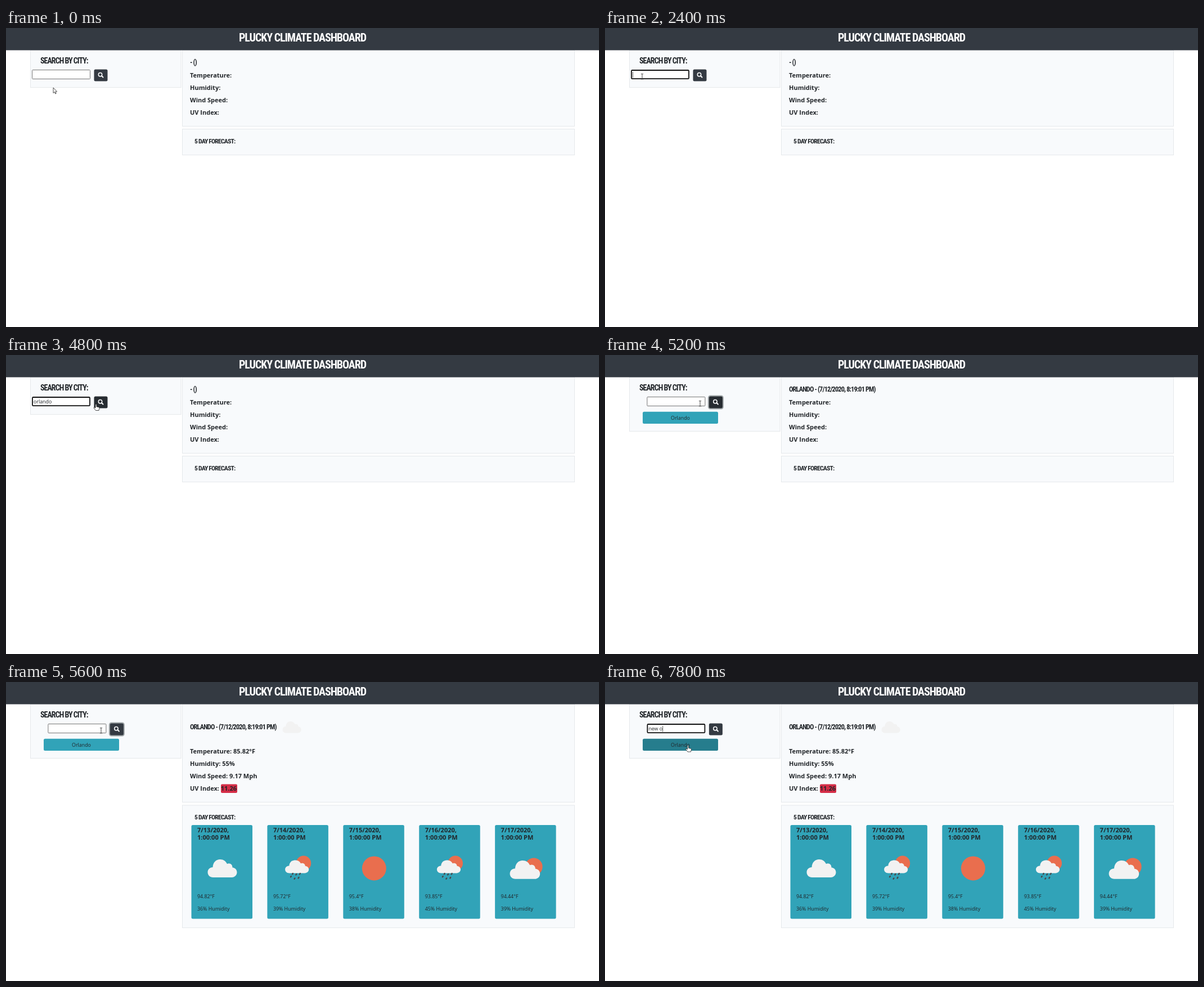
Animation, 1054 px wide and 531 px high, one loop 8 s. Source, as an HTML page:

```html
<!DOCTYPE html>
<html lang="en">
<head>
<meta charset="utf-8">
<title>Weather dashboard</title>
<style>
  html, body { margin: 0; width: 100%; height: 100%; overflow: hidden; background: #fff; }
  svg { display: block; width: 1054px; height: 531px; }
  text { font: 8.85px "Open Sans", sans-serif; fill: #212529; white-space: pre; }
  .head { font: 700 12.3px "Roboto Condensed", Roboto, sans-serif; font-stretch: 75%; letter-spacing: -.07em; }
  .title { font-size: 20px; fill: #fff; text-anchor: middle; letter-spacing: -.053em; }
  .search { font-size: 14px; }
  .days { font-size: 11.7px; }
  .bold { font-weight: 700; font-size: 11px; }
  .mid { text-anchor: middle; }
  .panel { fill: #f8fafc; stroke: #e5e8eb; }
  .teal { fill: #31a3b8; }
  .hover { fill: #267d8d; }
  .cloud { fill: #f2f2f2; }
  .sun { fill: #e96e4e; }
  .rain { stroke: #48484a; stroke-width: 2.4; stroke-linecap: round; }
</style>
</head>
<body>
<svg viewBox="0 0 1054 531">
  <defs>
    <path id="cloud" class="cloud" d="M9.5 32C4 32 0 28 0 23c0-5.500 4-9 9-9C9.500 5 15 0 22 0c6 0 10 3 12.500 8 1-.5 2-.7 3-.7 4 0 6.500 3 6.500 7.200 5 .5 8 4 8 8.700 0 5-4 8.800-9 8.800z"/>
    <g id="cloudy"><use href="#cloud" x="29" y="61"/></g>
    <g id="clear"><circle class="sun" cx="55" cy="77" r="21.5"/></g>
    <g id="partly">
      <circle class="sun" cx="69" cy="74" r="15.5"/>
      <use href="#cloud" transform="translate(26.5 63) scale(1.03)"/>
    </g>
    <g id="showers">
      <circle class="sun" cx="64.500" cy="68" r="13.300"/>
      <use href="#cloud" transform="translate(31.700 62.500) scale(.81 .72)"/>
      <path class="rain" d="M45.500 86l-.8 1.300M52 87l-1 1.500M58.500 86l-1 1.500M42.500 91l-.8 1.300M49 94.500l-.8 1.300M56 93l-.8 1.500"/>
    </g>
    <path id="arrow" d="M0 0v9.500l2.200-2 1.500 3.400 1.500-.7-1.500-3.200h2.900z" fill="#fff" stroke="#222" stroke-width=".8"/>
    <path id="beam" d="M-2-4.500h1.500l.5.500.5-.5H2M0-4v8.500M-2 5h1.500l.5-.5.5.5H2" fill="none" stroke="#333" stroke-width=".9"/>
    <path id="hand" d="M-1 .8Q0-.6 1 .8v4l4.200 1q.8.300.8 1.400L5 11.500H-.5L-4 7q0-1.400 1.400-1L-1 7.200z" fill="#fff" stroke="#222" stroke-width=".8"/>
  </defs>

  <rect class="panel" id="side" x="43.500" y="39.500" width="267.500"/>
  <rect class="panel" id="current" x="313.500" y="39.500" width="697"/>
  <rect width="1054" height="39.500" fill="#343a42"/>
  <text class="head title" x="527" y="24">PLUCKY CLIMATE DASHBOARD</text>
  <text class="head search" x="61" y="63">SEARCH BY CITY:</text>

  <text class="head" id="city" x="327"></text>
  <use id="cityIcon" href="#cloud" transform="translate(491.500 70) scale(.64)"/>
  <g id="metrics">
    <rect id="badge" x="382" y="142" width="29" height="15.500" rx="2" fill="#d42d47"/>
  </g>

  <g id="forecast">
    <rect class="panel" id="days" x="313.500" y="179.500" width="697"/>
    <text class="head days" x="335" y="204.500">5 DAY FORECAST:</text>
    <g id="cards"></g>
  </g>

  <g id="saved">
    <rect id="savedBox" x="67" y="100.800" width="134" height="21.300" rx="2.500"/>
    <text class="mid" x="134" y="114.500">Orlando</text>
  </g>

  <g id="form">
    <rect id="field" fill="#fff"/>
    <text id="typed" x="49" y="86"></text>
    <rect id="caret" y="78" width=".8" height="10.500" fill="#333"/>
    <rect id="button" x="156.500" y="73.500" width="24" height="21" rx="2.500" paint-order="stroke"/>
    <path d="M170 85l2.500 2.500" stroke="#fff" stroke-width="1.900" stroke-linecap="round"/>
    <circle cx="167.500" cy="82.800" r="3.200" fill="none" stroke="#fff" stroke-width="1.500"/>
    <g id="list">
      <rect id="listBox" x="46.500" y="92.500" width="104" fill="#fff" stroke="#c8c8c8"/>
      <rect id="listHover" x="47" y="96.500" width="103" height="19.700" fill="#e8e8e9"/>
    </g>
  </g>
  <use id="pointer"/>
</svg>
<script>
const $ = id => document.getElementById(id);
const STEP = 200, LOOP = 8000, ROW = 19.7;

function add(parent, tag, attrs, text = "") {
  const el = document.createElementNS("http://www.w3.org/2000/svg", tag);
  set(el, attrs);
  el.textContent = text;
  return parent.appendChild(el);
}
function set(el, attrs) {
  for (const key in attrs) el.setAttribute(key, attrs[key]);
}
const show = (el, on) => { el.style.display = on ? "" : "none"; };
const shift = (el, x, y) => el.setAttribute("transform", `translate(${x} ${y})`);

const metrics = [
  ["Temperature:", " 85.82°F"], ["Humidity:", " 55%"],
  ["Wind Speed:", " 9.17 Mph"], ["UV Index:", " 11.26"]
].map(([label, value], i) => {
  const el = add($("metrics"), "text", { class: "bold", x: 327, y: 88 + i * 21.9 });
  return { el, label, value };
});

const cards = [
  ["cloudy", "94.82", 36], ["showers", "95.72", 39], ["clear", "95.4", 38],
  ["showers", "93.85", 45], ["partly", "94.44", 39]
].map(([icon, degrees, humidity], i) => {
  const g = add($("cards"), "g", { transform: `translate(${329.5 + i * 134.9} 214.5)` });
  const box = add(g, "rect", { class: "teal", width: 108.5, rx: 2.5 });
  add(g, "text", { class: "bold", x: 10.5, y: 13.3 }, `7/${13 + i}/2020,`);
  add(g, "text", { class: "bold", x: 10.5, y: 26.5 }, "1:00:00 PM");
  const image = add(g, "use", { href: "#" + icon });
  const details = add(g, "g", {});
  add(details, "text", { x: 10.5, y: 43 }, degrees + "°F");
  add(details, "text", { x: 10.5, y: 65 }, humidity + "% Humidity");
  return { box, image, details };
});

const options = ["orlando", "chicago", "boston", "denver"].map((name, i) =>
  add($("list"), "text", { x: 50, y: 109.5 + i * ROW }, name));

// Tracks hold [step, ...value]; each entry lasts until the next one.
const pointerTrack = [
  [0, "arrow", 84, 106], [1, "arrow", 84, 104], [2, "arrow", 82, 101], [3, "arrow", 78, 96],
  [4, "beam", 72, 88], [5, "beam", 68, 87], [6, "beam", 66, 86],
  [8, "arrow", 66, 104], [10, "arrow", 66, 101], [11, "arrow", 66, 95], [12, "beam", 66, 86],
  [21, "beam", 72, 88], [22, "arrow", 95, 95], [23, "arrow", 130, 93],
  [24, "hand", 160, 87], [25, "hand", 169, 82], [26, "beam", 169, 86],
  [30, "beam", 160, 86], [31, "beam", 150, 86], [32, "arrow", 147, 112], [35, "hand", 147.5, 112.5]
];
const typedTrack = [
  [0, ""], [14, "o"], [15, "or"], [16, "orla"], [17, "orlan"], [18, "orlando"],
  [26, ""], [36, "n"], [37, "ne"], [38, "new "], [39, "new o"]
];
const rowsTrack = [[0, 0], [7, 4], [12, 0], [14, 1], [18, 0], [31, 4], [35, 0]];
const phaseTrack = [[0, 0], [26, 1], [27, 2], [28, 3]];
const at = (track, step) => track.findLast(entry => entry[0] <= step).slice(1);
const within = (step, from, to) => step >= from && step < to;

function drawWeather(phase) {
  const full = phase === 3, data = phase >= 2;
  set($("side"), { height: phase ? 96 : 66 });
  set($("current"), { height: full ? 174 : 135 });
  set($("days"), { height: [46, 46, 131, 217.5][phase] });
  $("city").textContent = phase ? "ORLANDO - (7/12/2020, 8:19:01 PM)" : "- ()";
  set($("city"), { y: full ? 84 : 65 });
  show($("cityIcon"), full);
  show($("badge"), data);
  show($("cards"), data);
  show($("saved"), phase > 0);
  shift($("metrics"), 0, full ? 39.4 : 0);
  shift($("forecast"), 0, full ? 39.4 : 0);
  for (const m of metrics) m.el.textContent = m.label + (data ? m.value : "");
  for (const c of cards) {
    set(c.box, { height: full ? 166.5 : 80 });
    show(c.image, full);
    shift(c.details, 0, full ? 87 : 0);
  }
}

function drawForm(step, phase) {
  const focused = within(step, 6, 25) || step >= 31;
  const [text] = at(typedTrack, step), [rows] = at(rowsTrack, step);
  shift($("form"), phase ? 28.4 : 0, 0);
  set($("field"), focused
    ? { x: 47, y: 75, width: 102, height: 15.2, rx: 1.5, stroke: "#101010", "stroke-width": 1.8 }
    : { x: 46.5, y: 74.5, width: 103, height: 16, rx: 1, stroke: "#767676", "stroke-width": 1 });
  $("typed").textContent = text;
  set($("caret"), { x: 49.2 + (text ? $("typed").getComputedTextLength() : 0) });
  show($("caret"), focused && !within(step, 20, 25));
  const glow = within(step, 25, 31);
  set($("button"), {
    fill: within(step, 24, 27) ? "#272c31" : "#343a42",
    stroke: glow ? "#a3a9ab" : "none", "stroke-width": 4
  });
  show($("list"), rows > 0);
  set($("listBox"), { height: 8 + rows * ROW });
  options.forEach((el, i) => show(el, i < rows));
  show($("listHover"), within(step, 8, 11) || within(step, 32, 35));
  set($("savedBox"), { class: step >= 35 ? "hover" : "teal" });
}

let last = -1;
function frame(now) {
  const step = Math.floor(now % LOOP / STEP);
  if (step !== last) {
    last = step;
    const [phase] = at(phaseTrack, step);
    const [shape, x, y] = at(pointerTrack, step);
    drawWeather(phase);
    drawForm(step, phase);
    set($("pointer"), { href: "#" + shape });
    shift($("pointer"), x, y);
  }
  requestAnimationFrame(frame);
}
frame(performance.now());
</script>
</body>
</html>
```
